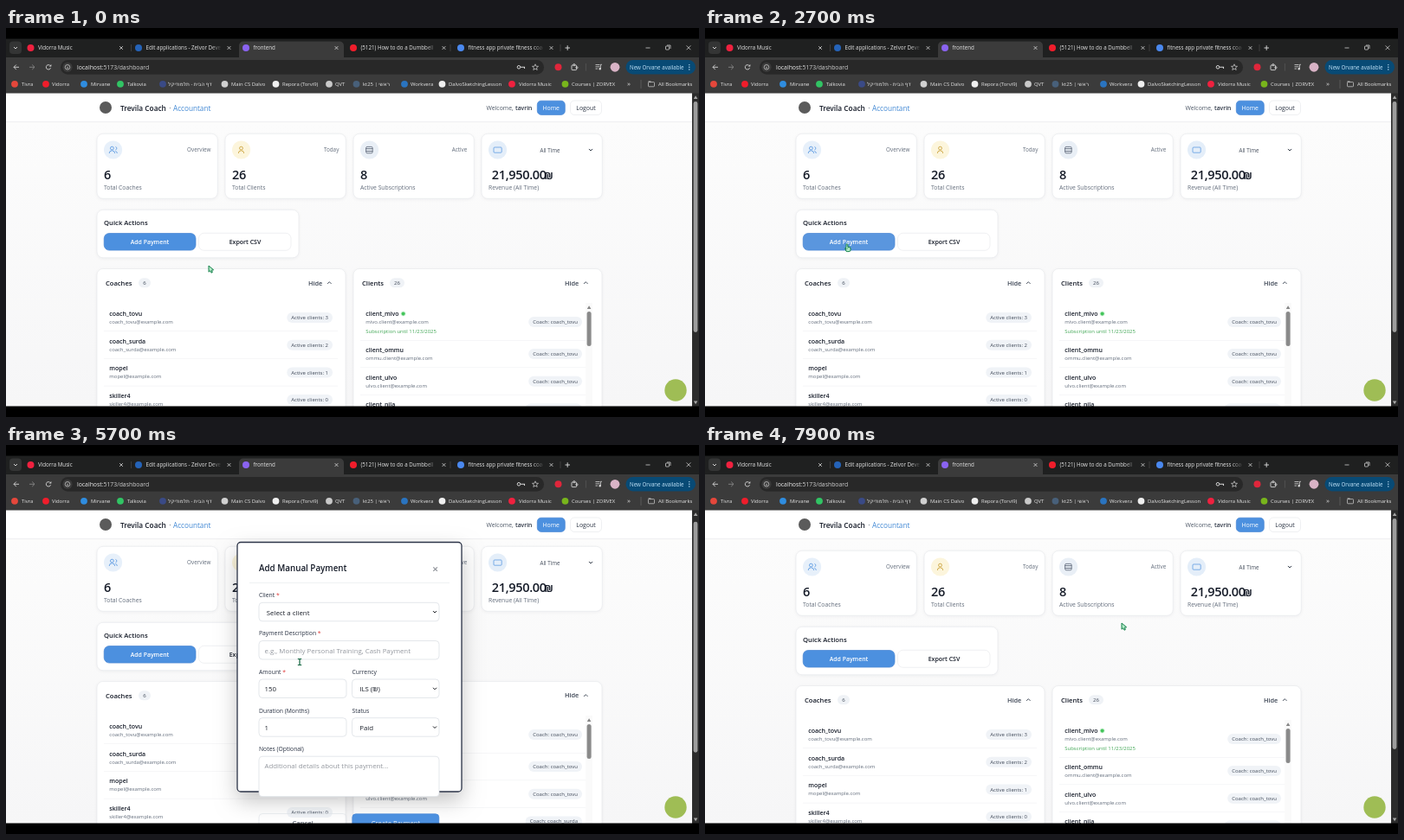
An HTML page with a canvas for the animation above (8000 ms loop, 800x450 px).

```html
<!DOCTYPE html>
<html lang="en">
<head>
<meta charset="utf-8">
<title>Dashboard</title>
<style>
html, body { margin: 0; width: 100%; height: 100%; overflow: hidden; background: #000; }
canvas { display: block; width: 800px; height: 450px; }
</style>
</head>
<body>
<canvas id="stage"></canvas>
<script>
const LOOP = 8000, OPEN_AT = 3100, CLOSE_AT = 7500;
const TOP = 12.5, PAGE = 75.5, BOTTOM = 437.5;
const FONT = '"Open Sans", "Noto Sans", "DejaVu Sans", sans-serif';
const INK = '#151b28', GRAY = '#626c7b', BLUE = '#4c90df', LINE = '#e9eaed';
const canvas = document.getElementById('stage');
const ctx = canvas.getContext('2d');
const dpr = window.devicePixelRatio || 1;
canvas.width = 800 * dpr;
canvas.height = 450 * dpr;

// [time, x, y] of the pointer's hot spot
const POINTER = [[0, 234, 275], [300, 234, 275], [1500, 126, 246], [1900, 126, 246],
  [2700, 164, 250], [4500, 164, 250], [5400, 339, 251], [5800, 339, 251],
  [6200, 368, 264], [6500, 368, 264], [7200, 501, 148], [7500, 501, 148],
  [7850, 481, 206], [8000, 481, 206]];
const SCROLL = [[0, 0], [5600, 0], [5700, 5], [6050, 67.5], [6450, 67.5], [6900, 0], [8000, 0]];

const COACHES = [['coach_tovu', 3], ['coach_surda', 2], ['mopel', 1], ['skiller4', 0],
  ['belko', 1], ['testtutor', 1]];
const CLIENTS = [['mivo', 'tovu'], ['ommu', 'tovu'], ['ulvo', 'tovu'], ['nila', 'surda'],
  ['torvi', 'surda'], ['senka', 'surda']];

function track(keys, t) {
  let i = 0;
  while (i < keys.length - 2 && t >= keys[i + 1][0]) i++;
  const a = keys[i], b = keys[i + 1];
  const p = Math.min(1, (t - a[0]) / (b[0] - a[0]));
  const e = p * p * (3 - 2 * p);
  return a.slice(1).map((v, k) => v + (b[k + 1] - v) * e);
}

function text(s, x, y, size, color, weight = 400, align = 'left') {
  ctx.font = `${weight} ${size}px ${FONT}`;
  ctx.fillStyle = color;
  ctx.textAlign = align;
  ctx.fillText(s, x, y);
}

function rect(x, y, w, h, color) {
  ctx.fillStyle = color;
  ctx.fillRect(x, y, w, h);
}

function box(x, y, w, h, r, fill, stroke, width = 0.7) {
  ctx.beginPath();
  ctx.roundRect(x, y, w, h, r);
  if (fill) { ctx.fillStyle = fill; ctx.fill(); }
  if (stroke) { ctx.strokeStyle = stroke; ctx.lineWidth = width; ctx.stroke(); }
}

function disc(x, y, r, fill) {
  ctx.beginPath();
  ctx.arc(x, y, r, 0, 7);
  ctx.fillStyle = fill;
  ctx.fill();
}

function ring(x, y, r, color, width = 0.8, from = 0, to = 2 * Math.PI) {
  ctx.beginPath();
  ctx.arc(x, y, r, from, to);
  ctx.strokeStyle = color;
  ctx.lineWidth = width;
  ctx.stroke();
}

function line(color, width, ...p) {
  ctx.beginPath();
  for (let i = 0; i < p.length; i += 2) ctx.lineTo(p[i], p[i + 1]);
  ctx.strokeStyle = color;
  ctx.lineWidth = width;
  ctx.stroke();
}

function shape(fill, ...p) {
  ctx.beginPath();
  for (let i = 0; i < p.length; i += 2) ctx.lineTo(p[i], p[i + 1]);
  ctx.closePath();
  ctx.fillStyle = fill;
  ctx.fill();
}

function cross(x, y, r, color, width = 0.8) {
  line(color, width, x - r, y - r, x + r, y + r);
  line(color, width, x + r, y - r, x - r, y + r);
}

function chevron(x, y, r, dir, color, width = 0.9) {
  line(color, width, x - r, y - dir * r / 2, x, y + dir * r / 2, x + r, y - dir * r / 2);
}

function withShadow(color, blur, dy, draw) {
  ctx.save();
  ctx.shadowColor = color;
  ctx.shadowBlur = blur * dpr;
  ctx.shadowOffsetY = dy * dpr;
  draw();
  ctx.restore();
}

function panel(x, y, w, h) {
  withShadow('rgba(20,30,50,.06)', 4, 1, () => box(x, y, w, h, 7, '#fff'));
  box(x, y, w, h, 7, null, LINE);
}

function blueButton(x, y, w, h, r, fill = BLUE) {
  box(x, y, w, h, r, fill, '#4785d3');
}

function tab(x, title, color, active) {
  if (active) box(x - 8, 15.6, 121, 22, [5, 5, 0, 0], '#3b3b3b');
  disc(x, 23, 4, color);
  ctx.save();
  ctx.beginPath();
  ctx.rect(x, 14, 95, 18);
  ctx.clip();
  text(title, x + 8.5, 25.3, 6.2, '#e6e6e6');
  const bg = active ? '59,59,59' : '31,32,32';
  const fade = ctx.createLinearGradient(x + 84, 0, x + 96, 0);
  fade.addColorStop(0, `rgba(${bg},0)`);
  fade.addColorStop(1, `rgb(${bg})`);
  rect(x + 84, 16, 12, 16, fade);
  ctx.restore();
  cross(x + 104.5, 23, 1.9, '#d8d8d8');
}

function drawTabs() {
  rect(0, 0, 800, 34, '#1f2020');
  rect(0, 0, 800, TOP, '#000');
  box(4, 15.5, 14, 14.5, 4, '#343535');
  chevron(11, 23, 2, 1, '#e3e3e3');
  tab(28.5, 'Vidorra Music', '#f0213f');
  tab(153, 'Edit applications - Zelvor Developer', '#2563b8');
  tab(277, 'frontend', '#8a63f0', true);
  tab(401, '(5121) How to do a Dumbbell | Form', '#f01d2b');
  tab(525, 'fitness app private fitness coach', '#4a88ee');
  for (const x of [144.5, 513, 640]) line('#4b4b4b', 0.7, x, 19, x, 27);
  line('#dedede', 0.9, 645.5, 23, 651, 23);
  line('#dedede', 0.9, 648.2, 20.2, 648.2, 25.8);
  line('#e6e6e6', 0.7, 738.5, 23, 743.5, 23);
  box(761.5, 21, 4, 4, 0.6, null, '#e6e6e6');
  line('#e6e6e6', 0.7, 763, 20, 767, 20, 767, 24);
  cross(788, 22.8, 2.4, '#e6e6e6', 0.7);
}

function drawToolbar() {
  const c = '#d5d5d5';
  rect(0, 34, 800, PAGE - 34, '#3b3b3b');
  line(c, 0.9, 15, 45.3, 9, 45.3);
  line(c, 0.9, 11.8, 42.5, 9, 45.3, 11.8, 48.1);
  line('#858585', 0.9, 27, 45.3, 33, 45.3);
  line('#858585', 0.9, 30.2, 42.5, 33, 45.3, 30.2, 48.1);
  ring(49, 45.3, 2.7, c, 0.9, 0.3, 5.4);
  shape(c, 49.8, 44.6, 52.3, 44.6, 52.3, 42);
  box(63, 37, 558, 16.8, 8.4, '#282828');
  disc(71, 45.3, 5.6, '#3b3b3b');
  ring(71, 45.3, 2.8, c, 0.7);
  line(c, 0.8, 71, 44.8, 71, 47);
  text('localhost', 82, 47.7, 6.85, '#f0f0f0');
  const w = ctx.measureText('localhost').width;
  text(':5173/dashboard', 82 + w, 47.7, 6.85, '#cfcfcf');
  ring(592, 45.3, 1.8, c, 1);
  line(c, 1.1, 594, 45.3, 598.5, 45.3, 598.5, 47);
  ctx.beginPath();
  for (let i = 0; i < 10; i++) {
    const r = i % 2 ? 1.6 : 3.7, a = i * Math.PI / 5 - Math.PI / 2;
    ctx.lineTo(611 + r * Math.cos(a), 45.5 + r * Math.sin(a));
  }
  ctx.closePath();
  ctx.strokeStyle = c;
  ctx.lineWidth = 0.7;
  ctx.stroke();
  disc(637.5, 45.3, 4, '#e0263b');
  box(653, 43, 5.6, 5.6, 0.8, null, c, 0.9);
  ring(655.8, 42.6, 1.1, c);
  ring(659, 45.8, 1.1, c);
  line('#5a5a5a', 0.7, 669.5, 41, 669.5, 49.5);
  for (const y of [42.5, 44.8]) line(c, 0.8, 680.5, y, 685.5, y);
  line(c, 0.8, 680.5, 47.1, 683, 47.1);
  line(c, 0.8, 686.4, 47, 686.4, 42.3, 688, 42.3);
  disc(685.7, 47.2, 1.2, c);
  disc(703, 45.3, 5.4, '#d9b3c6');
  box(715.5, 37, 80.5, 16.5, 8.2, '#084a75');
  text('New Orvane available', 720, 47.5, 6.2, '#c5e6fb');
  for (const y of [42.6, 45.3, 48]) disc(788.8, y, 0.7, '#c5e6fb');
}

function drawBookmarks() {
  const marks = [[10, 18, 'Tivra', '#e5473b'], [46, 53, 'Vidorra', '#f01d2b'],
    [90, 98, 'Mirvane', '#2f8de0'], [132, 140, 'Talkovia', '#31c464'],
    [181, 187, 'דף הבית - תלמודיקל', '#3a4a86'], [252.5, 260, 'Main CS Dalvo', '#d0d0d0'],
    [311.5, 319, 'Repora (Torvi9)', '#f0f0f0'], [373, 380, 'QVT', '#c9c9c9'],
    [404.5, 412, 'kt25 | ראשי', '#48607a'], [460, 467, 'Workvera', '#2a74c0'],
    [503.5, 511, 'DalvoSketchingLesson', '#f0f0f0'], [584, 592, 'Vidorra Music', '#f0213f'],
    [645.5, 653, 'Courses | ZORVEX', '#78b51c']];
  for (const [ix, tx, label, color] of marks) {
    disc(ix, 64.8, 3.9, color);
    text(label, tx, 66.8, 5.9, '#e6e6e6');
  }
  text('»', 717, 67, 8, '#d5d5d5');
  line('#686868', 0.7, 733, 60, 733, 70);
  box(741.5, 62.6, 7, 5.2, 0.8, null, '#d5d5d5');
  line('#d5d5d5', 0.9, 741.5, 62, 744.5, 62);
  text('All Bookmarks', 753, 66.8, 5.9, '#e6e6e6');
}

function person(x, y, color) {
  ring(x, y - 1.9, 1.9, color);
  ring(x, y + 4, 3.2, color, 0.8, Math.PI, 2 * Math.PI);
}

function drawStats() {
  const cards = [['Overview', '6', 'Total Coaches', '#e7f0fa'],
    ['Today', '26', 'Total Clients', '#fcf5dc'],
    ['Active', '8', 'Active Subscriptions', '#e9eff6'],
    ['', '21,950.00', 'Revenue (All Time)', '#e4eef9']];
  cards.forEach(([tag, value, label, tint], i) => {
    const x = 105 + 148 * i;
    panel(x, 122.3, 139.3, 75);
    disc(x + 18.6, 141, 10.6, tint);
    text(tag, x + 131.3, 143.4, 6.3, GRAY, 400, 'right');
    ctx.letterSpacing = '-0.3px';
    text(value, x + (i === 3 ? 11.7 : 8), 175.3, 14.5, INK, 600);
    ctx.letterSpacing = '0px';
    text(label, x + 8, 186.7, 6.8, GRAY);
  });
  text('₪', 631.5, 175.3, 11, INK, 600, 'right');
  person(122.4, 141, BLUE);
  ring(126, 139.2, 1.8, BLUE, 0.8, -1.3, 1.3);
  ring(125.6, 145, 2.7, BLUE, 0.8, -1.3, 0);
  person(271.5, 141, '#c69a2c');
  box(415.6, 137.4, 7.6, 7.4, 1.5, null, '#465063');
  line('#465063', 0.8, 415.6, 139.7, 423.2, 139.7);
  line('#465063', 0.8, 415.6, 142.6, 423.2, 142.6);
  box(563, 138, 9.2, 6.2, 1, null, BLUE);
  text('All Time', 616.5, 143.8, 6.2, '#434c5a');
  chevron(675, 141, 2.1, 1, '#3b4350', 1);
}

function pill(right, y, label, size = 6) {
  ctx.font = `500 ${size}px ${FONT}`;
  const w = ctx.measureText(label).width;
  box(right - w - 10, y - 6, w + 10, 12, 6, '#f0f3f7');
  text(label, right - 5, y + 2.1, size, '#3f4857', 500, 'right');
}

function listHead(x, title, count, w) {
  panel(x, 278.5, 287, 260);
  text(title, x + 10, 297.6, 7.6, INK, 600);
  const cx = x + (count > 9 ? 50.5 : 55);
  box(cx - w / 2, 289.3, w, 11, 5.5, '#eff2f6');
  text(count, cx, 297, 6, '#3f4857', 500, 'center');
  text('Hide', x + 244, 297.5, 7.3, '#3a4352', 600);
  chevron(x + 268.3, 294.8, 2.3, -1, '#3a4352');
}

function drawLists() {
  listHead(105, 'Coaches', 6, 14);
  COACHES.forEach(([name, n], i) => {
    const y = 335 + 31.7 * i;
    text(name, 119.3, y - 2, 7, INK, 600);
    text(name + '@example.com', 119.3, y + 6.9, 5.95, GRAY);
    pill(377, y, 'Active clients: ' + n);
    rect(113, y + 15.4, 270, 0.6, '#f0f1f3');
  });
  listHead(401, 'Clients', 26, 17);
  CLIENTS.forEach(([name, coach], i) => {
    const y = i ? 377 + 31.7 * (i - 1) : 340;
    const top = i ? y - 2 : 333;
    text('client_' + name, 415.3, top, 7, INK, 600);
    text(name + '.client@example.com', 415.3, top + 8.9, 5.95, GRAY);
    pill(665, y, 'Coach: coach_' + coach);
    rect(409, i ? y + 15.5 : 361, 260, 0.6, '#f0f1f3');
  });
  disc(458.6, 330.6, 3, '#d9f5df');
  disc(458.6, 330.6, 2.1, '#45c55c');
  text('Subscription until 11/23/2025', 415.3, 352.6, 5.95, '#3da552');
  rect(669, 318, 8, 200, '#fafafa');
  shape('#858585', 670.8, 325, 675.4, 325, 673.1, 321.3);
  box(670.6, 328, 5, 40, 2.5, '#8a8a8a');
}

function drawActions(hover) {
  panel(105, 210.3, 233, 55.5);
  text('Quick Actions', 113, 228.2, 7.7, INK, 600);
  blueButton(113.2, 237.5, 105.8, 19.6, 6, hover ? '#5a96de' : BLUE);
  text('Add Payment', 166, 250.2, 6.9, '#fff', 600, 'center');
  box(222.5, 237.3, 106.5, 20, 6, '#fff', LINE);
  text('Export CSV', 276, 250.2, 7, INK, 600, 'center');
}

function drawHeader() {
  rect(0, 75, 792, 34, 'rgba(255,255,255,.96)');
  rect(0, 108.4, 792, 0.7, '#e6e7ea');
  disc(115, 92, 7, '#5b5b5b');
  text('Trevila Coach', 132, 95.5, 8.3, INK, 600);
  text('·', 188.3, 95.5, 8.3, GRAY);
  text('Accountant', 193, 95.5, 8.2, '#4088d4', 500);
  text('Welcome,', 554.5, 95.3, 6.9, '#4f5968');
  text('tavrin', 588, 95.3, 6.8, '#2a3342', 600);
  blueButton(613.3, 84.2, 32, 16.2, 4.5);
  text('Home', 629.2, 95, 6.9, '#fff', 500, 'center');
  box(651.5, 84, 36, 16.5, 4.5, '#fff', LINE);
  text('Logout', 669.5, 95, 6.9, '#2a3342', 500, 'center');
}

function field(x, y, w, h, label, value, kind) {
  const name = label.replace('*', '');
  text(name, x, y - 6.1, 6.8, '#283142', 500);
  if (name !== label) text('*', x + ctx.measureText(name).width, y - 6.1, 6.8, '#e0403f', 500);
  box(x, y, w, h, 4, '#fff', '#d9dde3');
  const isSelect = kind === 'select';
  text(value, x + (isSelect ? 8.7 : 6.5), y + 14.2, 7.85, kind === 'hint' ? '#94989f' : '#1c212b');
  if (isSelect) chevron(x + w - 5, y + 10.8, 2, 1, '#15181e', 1);
}

function drawModal(closeHover) {
  withShadow('rgba(0,0,0,.24)', 24, 10, () => box(267, 112.5, 259, 288.5, 4, '#fff'));
  box(267, 112.5, 259, 288.5, 4, null, '#2c3448', 1.3);
  text('Add Manual Payment', 292, 146.2, 9.8, INK, 600);
  cross(495.6, 143.6, 2.3, closeHover ? '#30343b' : '#8a8e95', 1.1);
  rect(281, 159, 231, 0.7, '#e9ebee');
  field(292, 182.3, 208, 21.5, 'Client *', 'Select a client', 'select');
  field(292, 226.5, 208, 21.5, 'Payment Description *', 'e.g., Monthly Personal Training, Cash Payment', 'hint');
  field(292, 271, 101, 21.5, 'Amount *', '150');
  field(399.5, 271, 100.5, 21.5, 'Currency', 'ILS (₪)', 'select');
  field(292, 315.7, 101, 21.5, 'Duration (Months)', '1');
  field(399.5, 315.7, 100.5, 21.5, 'Status', 'Paid', 'select');
  field(292, 360.2, 208, 46.5, 'Notes (Optional)', 'Additional details about this payment...', 'hint');
  box(292, 426.5, 101, 22, 4, null, '#dfe2e7');
  text('Cancel', 342.5, 440, 7.8, '#3a4352', 500, 'center');
  blueButton(399.8, 426.8, 100, 22, 4);
  text('Create Payment', 450, 440, 7.6, '#fff', 500, 'center');
}

function drawPageBar(scroll) {
  rect(792, 75, 8, 363, '#2c2c2c');
  shape('#a5a5a5', 793.8, 82, 798.4, 82, 796.1, 78.3);
  shape('#a5a5a5', 793.8, 431.5, 798.4, 431.5, 796.1, 435.2);
  box(793.6, 85 + scroll * 0.737, 4.8, 267, 2.4, '#9d9d9d');
}

function drawPointer(x, y, kind) {
  const rim = '#14804a', fill = '#b4ecc9';
  ctx.save();
  ctx.translate(x, y);
  ctx.lineJoin = 'round';
  if (kind === 'text') {
    line('#1d6b48', 1.3, 0, -3.4, 0, 3.4);
    line('#1d6b48', 1.1, -2.2, -3.5, 2.2, -3.5);
    line('#1d6b48', 1.1, -2.2, 3.5, 2.2, 3.5);
  } else if (kind === 'hand') {
    box(-1.6, 3.4, 5.6, 5.2, 1.8, fill, rim, 1);
    box(-1, -0.2, 1.8, 6, 0.9, fill, rim, 0.9);
    line(rim, 0.9, -1.5, 6.6, -2.6, 4.6);
    rect(-0.6, 3, 1.1, 3, fill);
  } else {
    const p = [0, 0, 0, 7.2, 1.8, 5.8, 3, 8.2, 4.4, 7.5, 3.4, 5.2, 5.6, 4.8];
    shape(fill, ...p);
    line(rim, 1, ...p, 0, 0);
  }
  ctx.restore();
}

function within(x, y, x0, y0, x1, y1) {
  return x >= x0 && x <= x1 && y >= y0 && y <= y1;
}

function draw(t) {
  const [x, y] = track(POINTER, t);
  const [scroll] = track(SCROLL, t);
  const open = t >= OPEN_AT && t < CLOSE_AT;
  const onButton = within(x, y + scroll, 113, 237, 219, 257);
  const onClose = open && within(x, y, 488, 136, 505, 153);
  const onField = open && (within(x, y, 292, 226, 500, 252) || within(x, y, 292, 271, 393, 293));

  ctx.setTransform(dpr, 0, 0, dpr, 0, 0);
  const bg = ctx.createLinearGradient(0, 109, 0, 437);
  bg.addColorStop(0, '#fcfcfc');
  bg.addColorStop(1, '#f6f6f7');
  rect(0, 75, 800, 363, bg);
  ctx.save();
  ctx.beginPath();
  ctx.rect(0, 75, 792, 363);
  ctx.clip();
  ctx.save();
  ctx.translate(0, -scroll);
  drawStats();
  drawActions(onButton);
  drawLists();
  ctx.restore();
  drawHeader();
  if (open) drawModal(onClose);
  disc(773, 419, 12.7, '#9fbd55');
  ctx.restore();
  drawPageBar(scroll);
  drawTabs();
  drawToolbar();
  drawBookmarks();
  rect(0, BOTTOM, 800, 450 - BOTTOM, '#000');
  drawPointer(x, y, onButton || onClose ? 'hand' : onField ? 'text' : 'arrow');
}

const start = performance.now();
function tick() {
  draw((performance.now() - start) % LOOP);
  requestAnimationFrame(tick);
}
tick();
</script>
</body>
</html>
```
